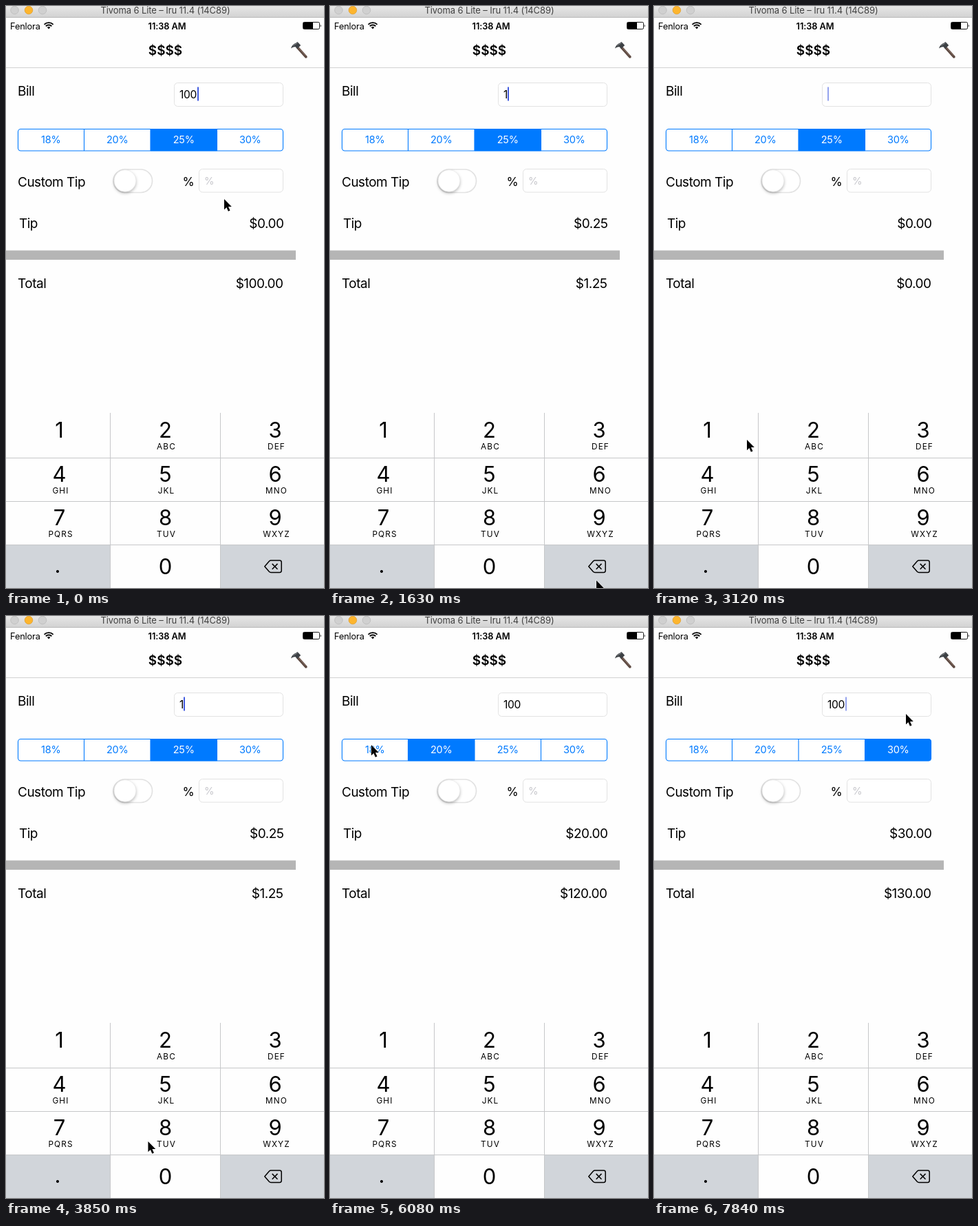
An HTML page for the animation above (7.99 s loop, 462x844 px).

```html
<!DOCTYPE html>
<html lang="en">
<head>
<meta charset="utf-8">
<title>Tip calculator</title>
<style>
html, body { margin: 0; width: 100%; height: 100%; overflow: hidden; background: #fefefe; }
svg { display: block; width: 462px; height: 844px; }
text { font-family: Inter, "Liberation Sans", sans-serif; white-space: pre; }
.label { font-size: 19px; letter-spacing: -.5px; }
.field { fill: #fff; stroke: #e2e2e2; }
.seg { font-size: 14.5px; letter-spacing: -.25px; }
.digit { font-size: 31px; }
.letters { font-size: 11.8px; letter-spacing: 1.1px; }
.mid { text-anchor: middle; }
.end { text-anchor: end; }
.knob { filter: drop-shadow(0 2.5px 2px rgba(0,0,0,.28)); }
</style>
</head>
<body>
<svg id="stage" viewBox="0 0 462 844">
  <defs>
    <linearGradient id="bar" x2="0" y2="1"><stop stop-color="#e6e6e6"/><stop offset="1" stop-color="#d2d2d2"/></linearGradient>
    <clipPath id="round"><rect x="17" y="178" width="386" height="32.5" rx="4.5"/></clipPath>
  </defs>
  <rect width="462" height="844" fill="#fefefe"/>

  <rect width="462" height="16.5" fill="url(#bar)"/>
  <path d="M0 16.5H462" stroke="#b9b9b9"/>
  <g stroke-width=".8">
    <circle cx="12.500" cy="6" r="5.800" fill="#d0d0d0" stroke="#bababa"/>
    <circle cx="33" cy="6" r="5.800" fill="#fdb52e" stroke="#e0a030"/>
    <circle cx="53" cy="6" r="5.800" fill="#d0d0d0" stroke="#bababa"/>
  </g>
  <text class="mid" x="231.500" y="11" font-size="13" letter-spacing="-.1" fill="#404040">Tivoma 6 Lite – Iru 11.4 (14C89)</text>

  <text x="6" y="33.500" font-size="12.800" letter-spacing="-.15">Fenlora</text>
  <g fill="none" stroke="#000" stroke-width="1.900">
    <path d="M55.600 26.800a9.200 9.200 0 0 1 13 0M57.900 29.200a6 6 0 0 1 8.400 0"/>
    <path d="M59.800 30.800L62.100 33.600L64.400 30.800Q62.100 29.400 59.800 30.800Z" fill="#000" stroke="none"/>
  </g>
  <text class="mid" x="234" y="33.500" font-size="12.800" font-weight="600" letter-spacing="-.1">11:38 AM</text>
  <rect x="431.500" y="23.500" width="24" height="10" rx="1.800" fill="#fff" stroke="#000" stroke-width=".9"/>
  <path d="M432 24h14v9h-14zM456.800 26.500q1.700 2 0 4z"/>

  <text class="mid" x="231.500" y="71" font-size="19" font-weight="600">$$$$</text>
  <path d="M0 89.500H462" stroke="#d2d2d2"/>
  <path d="M423.500 60L435.800 73.700" stroke="#5d4a42" stroke-width="3.800" stroke-linecap="round"/>
  <path d="M424 59.500L435.500 72.200" stroke="#8d7468" stroke-width="1"/>
  <path d="M414 61.500Q415.500 56 421 53.800L423.500 52L428.200 56.900L425.900 59.200L423.200 62L420.400 59.200Q417.500 58.800 414 61.500Z" fill="#3d4145"/>
  <path d="M417 57.500L423.500 53.500" stroke="#85898c"/>

  <text class="label" x="17" y="130">Bill</text>
  <rect class="field" x="244.500" y="111.500" width="158" height="34" rx="5"/>
  <text class="label" x="17" y="262">Custom Tip</text>
  <rect x="156" y="237" width="56.500" height="33.500" rx="16.750" fill="#fff" stroke="#e2e2e2" stroke-width="1.700"/>
  <circle class="knob" cx="173" cy="253.500" r="15.800" fill="#fff" stroke="#e4e4e4" stroke-width=".5"/>
  <text x="256.500" y="261" font-size="17.500">%</text>
  <rect class="field" x="280.500" y="236.500" width="122" height="33.500" rx="5"/>
  <text x="288" y="258.500" font-size="14.800" fill="#c7c7cc">%</text>
  <text class="label" x="19" y="322">Tip</text>
  <rect y="354.500" width="421" height="13.500" fill="#b5b5b5"/>
  <text class="label" x="17" y="409">Total</text>
  <g id="parts"></g>
</svg>
<script>
const parts = document.getElementById('parts');

function add(tag, attrs, text = '') {
  const el = document.createElementNS('http://www.w3.org/2000/svg', tag);
  for (const name in attrs) el.setAttribute(name, attrs[name]);
  el.textContent = text;
  parts.append(el);
  return el;
}
const label = (cls, x, y, text, more) => add('text', { class: cls, x, y, ...more }, text);

// Bill and amounts
const billText = label('', 252, 133.5, '', { 'font-size': 15.6, 'letter-spacing': -.4 });
const caret = add('rect', { y: 117.5, width: 2, height: 20, fill: '#425be0' });
const tipText = label('label end', 403.5, 322);
const totalText = label('label end', 402.5, 409);

// Rate picker
const BLUE = '#007aff';
const edges = [17, 113.5, 210, 306.5, 403];
const rates = [18, 20, 25, 30];
const segs = rates.map((rate, i) => {
  const box = add('rect', { x: edges[i], y: 178, width: edges[i + 1] - edges[i], height: 32.5, 'clip-path': 'url(#round)' });
  const text = label('seg mid', (edges[i] + edges[i + 1]) / 2, 199.3, rate + '%');
  return { box, text };
});
add('rect', { x: 17.5, y: 178.5, width: 385, height: 31.5, rx: 4, fill: 'none', stroke: BLUE, 'stroke-width': 1.1 });
add('path', { d: 'M113.500 178V210M210 178V210M306.500 178V210', stroke: BLUE, 'stroke-width': 1.1 });

// Keypad
const GREY = '#d1d5da';
const colX = [0, 151.5, 311.5, 462], rowY = [590, 655.5, 718.5, 781.5, 844];
const letters = ['', 'ABC', 'DEF', 'GHI', 'JKL', 'MNO', 'PQRS', 'TUV', 'WXYZ'];
const keys = {};
[1, 2, 3, 4, 5, 6, 7, 8, 9, '.', 0, 'del'].forEach((name, i) => {
  const c = i % 3, r = Math.floor(i / 3);
  keys[name] = add('rect', {
    x: colX[c], y: rowY[r], width: colX[c + 1] - colX[c], height: rowY[r + 1] - rowY[r]
  });
  const base = [625.5, 689.5, 752.5, 823.5][r];
  if (name !== 'del') label('digit mid', [77.5, 231.5, 391][c] - (name === '.' ? 2.5 : 0), base - (name === '.' ? 2 : 0), name);
  if (letters[i]) label('letters mid', [79.5, 233, 393][c], base + 17.5, letters[i]);
});
add('path', {
  d: 'M151.500 590V844M311.500 590V844M0 655.500H462M0 718.500H462M0 781.500H462',
  stroke: '#c6c7c9', 'stroke-width': 1
});
const delShape = add('path', {
  d: 'M375.800 812.800L382.300 805.200Q383.400 804 385 804H397.500Q400.200 804 400.200 806.700V818.800Q400.200 821.500 397.500 821.500H385Q383.400 821.500 382.300 820.300Z',
  stroke: '#000', 'stroke-width': 1.5, 'stroke-linejoin': 'round'
});
const delCross = add('path', { d: 'M386.700 808.900L394.500 816.700M394.500 808.900L386.700 816.700', 'stroke-width': 1.5 });

const pointer = add('path', {
  d: 'M0 0V15.200L3.400 12L5.900 17.700L8.500 16.600L6 11H10.800Z',
  stroke: '#fff', 'stroke-width': 1.1, 'paint-order': 'stroke'
});

// Steps last 150 ms, a few 140 ms
const short = [3, 9, 18, 22, 26, 32, 36, 42, 44, 46, 48];
const starts = [0];
for (let k = 0; k < 54; k++) starts.push(starts[k] + (short.includes(k) ? 140 : 150));
const LOOP = starts[54];

// step, bill, chosen rate, pressed key
const states = [
  [0, '100', 2, ''], [8, '10', 2, 'del'], [9, '10', 2, ''], [10, '1', 2, 'del'],
  [11, '1', 2, ''], [13, '', 2, 'del'], [15, '', 2, ''], [22, '', 2, '1'],
  [23, '1', 2, ''], [26, '1', 2, '0'], [27, '10', 2, ''], [28, '10', 2, '0'],
  [29, '100', 2, ''], [39, '100', 1, ''], [43, '100', 0, ''], [51, '100', 3, '']
];
// step, x, y of the pointer; true = decelerate only
const path = [
  [0, 317, 280], [7, 387, 833], [14, 387, 833], [21, 135, 629], [22, 122, 622],
  [23, 122, 622], [26, 236, 811], [31, 236, 811], [32, 242, 766], [39, 152, 188, true],
  [41, 60, 187], [43, 60, 187], [50, 365, 188], [51, 365, 187], [53, 366, 142]
];
// step, time at which the caret blink restarts
const blinks = [[0, 0], [8, 1190], [11, 1580], [23, 3410], [27, 4000], [29, 4300]];

const rowAt = (rows, k) => rows.findLast(row => row[0] <= k);

function pointerAt(k) {
  const a = rowAt(path, k), b = path[path.indexOf(a) + 1];
  if (!b) return [a[1], a[2]];
  const u = (k - a[0]) / (b[0] - a[0]);
  const e = b[3] ? u * (2 - u) : u * u * (3 - 2 * u);
  return [a[1] + (b[1] - a[1]) * e, a[2] + (b[2] - a[2]) * e];
}

function caretAlpha(k) {
  const p = (starts[k] - rowAt(blinks, k)[1] + 1000) % 1000;
  return p <= 500 ? 1 : Math.max(0, 1 - (p - 500) / 90);
}

function draw(k) {
  const [, bill, rate, pressed] = rowAt(states, k);
  const tip = k < 8 ? 0 : bill * rates[rate] / 100;
  billText.textContent = bill;
  tipText.textContent = '$' + tip.toFixed(2);
  totalText.textContent = '$' + (+bill + tip).toFixed(2);
  caret.setAttribute('x', [252, 258, 268, 278][bill.length]);
  caret.setAttribute('opacity', caretAlpha(k));
  segs.forEach(({ box, text }, i) => {
    box.setAttribute('fill', i === rate ? BLUE : '#fff');
    text.setAttribute('fill', i === rate ? '#fff' : BLUE);
  });
  for (const name in keys) {
    const grey = (name === '.' || name === 'del') !== (name === pressed);
    keys[name].setAttribute('fill', grey ? GREY : '#fefefe');
  }
  const down = pressed === 'del';
  delShape.setAttribute('fill', down ? '#000' : 'none');
  delCross.setAttribute('stroke', down ? '#fff' : '#000');
  pointer.setAttribute('transform', `translate(${pointerAt(k)})`);
}

let last = -1;
function tick() {
  const t = performance.now() % LOOP;
  const k = starts.findLastIndex(s => s <= t);
  if (k !== last) draw(last = k);
  requestAnimationFrame(tick);
}
tick();
</script>
</body>
</html>
```
